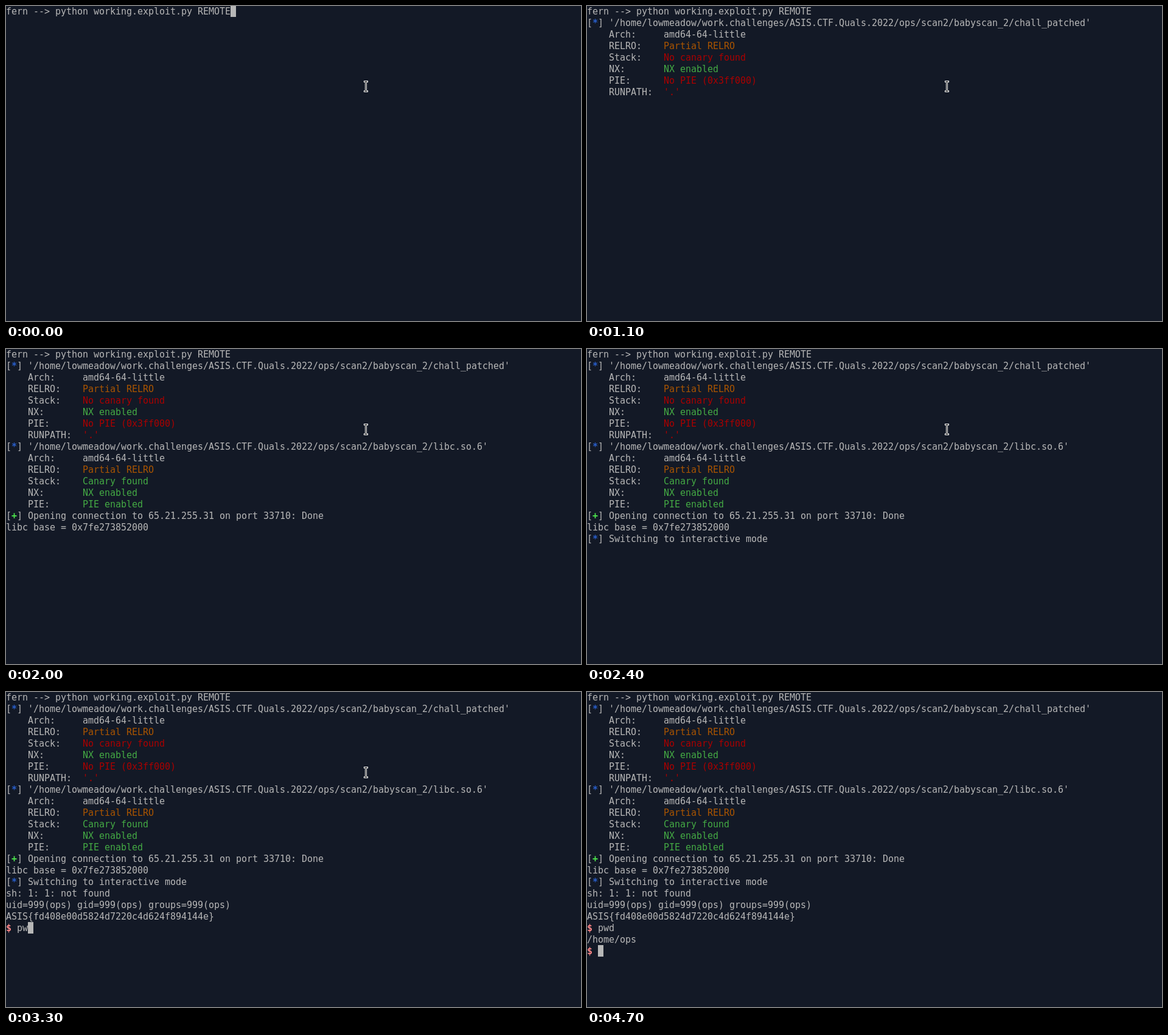
These frames come from a looping animation (945 px wide and 519 px high, 5700 ms). An HTML page:

```html
<!DOCTYPE html>
<html lang="en">
<head>
<meta charset="utf-8">
<title>Terminal session</title>
<style>
  html, body { margin: 0; width: 100%; height: 100%; overflow: hidden; background: #131926; }
  svg { display: block; width: 100%; height: 100%; }
  text { font: 15px "DejaVu Sans Mono", monospace; fill: #b7b7b7; white-space: pre; }
  .red { fill: #aa0000; }
  .green { fill: #44aa44; }
  .orange { fill: #aa5500; }
  .info { fill: #295fcc; font-weight: bold; }
  .done { fill: #4ce64c; font-weight: bold; }
  .prompt { fill: #ff8787; font-weight: bold; }
</style>
</head>
<body>
<svg id="stage" viewBox="0 0 945 519">
  <rect width="945" height="519" fill="#131926"/>
  <g id="screen"></g>
  <rect id="cursor" width="9" height="19" fill="#b7b7b7"/>
  <g id="pointer" shape-rendering="crispEdges">
    <path fill="#fff" d="M588 123h7v3h-2v13h2v3h-7v-3h2v-13h-2z"/>
    <path fill="#000" d="M589 124h5v1h-2v15h2v1h-5v-1h2v-15h-2z"/>
  </g>
</svg>
<script>
const LOOP = 5700, CELL = 9, ROW = 19;
const POINTER_END = 4700;
const $ = id => document.getElementById(id);
const screen = $("screen"), cursor = $("cursor"), pointer = $("pointer");
const items = [];

// Puts text on the character grid, visible from time `at` on.
function put(at, row, col, str, cls = "") {
  const el = document.createElementNS("http://www.w3.org/2000/svg", "text");
  el.setAttribute("x", [...str].map((_, i) => (col + i) * CELL).join(" "));
  el.setAttribute("y", row * ROW + 14);
  if (cls) el.setAttribute("class", cls);
  el.textContent = str;
  screen.append(el);
  items.push({ at, el });
}

function status(at, row, mark, cls, str) {
  put(at, row, 0, "[");
  put(at, row, 1, mark, cls);
  put(at, row, 2, "]");
  put(at, row, 4, str);
}

function checksec(at, row, file, fields) {
  const dir = "/home/lowmeadow/work.challenges/ASIS.CTF.Quals.2022/ops/scan2/babyscan_2/";
  status(at, row, "*", "info", `'${dir}${file}'`);
  fields.forEach(([name, value, cls], i) => {
    put(at, row + 1 + i, 4, name + ":");
    put(at, row + 1 + i, 14, value, cls);
  });
}

put(0, 0, 0, "fern --> python working.exploit.py REMOTE");
checksec(1100, 1, "chall_patched", [
  ["Arch", "amd64-64-little"],
  ["RELRO", "Partial RELRO", "orange"],
  ["Stack", "No canary found", "red"],
  ["NX", "NX enabled", "green"],
  ["PIE", "No PIE (0x3ff000)", "red"],
  ["RUNPATH", "'.'", "red"]
]);
checksec(1300, 8, "libc.so.6", [
  ["Arch", "amd64-64-little"],
  ["RELRO", "Partial RELRO", "orange"],
  ["Stack", "Canary found", "green"],
  ["NX", "NX enabled", "green"],
  ["PIE", "PIE enabled", "green"]
]);
status(1300, 14, "+", "done", "Opening connection to 65.21.255.31 on port 33710: Done");
put(2000, 15, 0, "libc base = 0x7fe273852000");
status(2400, 16, "*", "info", "Switching to interactive mode");
put(2500, 17, 0, "sh: 1: 1: not found");
put(2500, 18, 0, "uid=999(ops) gid=999(ops) groups=999(ops)");
put(2500, 19, 0, "ASIS{fd408e00d5824d7220c4d624f894144e}");
put(2500, 20, 0, "$", "prompt");
put(3300, 20, 2, "pw");
put(3600, 20, 4, "d");
put(3800, 21, 0, "/home/ops");
put(3800, 22, 0, "$", "prompt");

// Cursor steps: time, column, row; no cell means hidden.
const steps = [
  [0, 41, 0], [900, 0, 1], [1000], [2500, 2, 20],
  [3300, 4, 20], [3600, 5, 20], [3700, 0, 21], [3800, 2, 22]
];

const show = (el, on) => el.setAttribute("visibility", on ? "visible" : "hidden");

function draw(t) {
  for (const { at, el } of items) show(el, t >= at);
  const [, col, row] = steps.filter(s => s[0] <= t).pop();
  show(cursor, row !== undefined);
  if (row !== undefined) {
    cursor.setAttribute("x", col * CELL);
    cursor.setAttribute("y", row * ROW - 1);
  }
  show(pointer, t < POINTER_END);
}

const start = performance.now();
function tick() {
  draw((performance.now() - start) % LOOP);
  requestAnimationFrame(tick);
}
tick();
</script>
</body>
</html>
```
